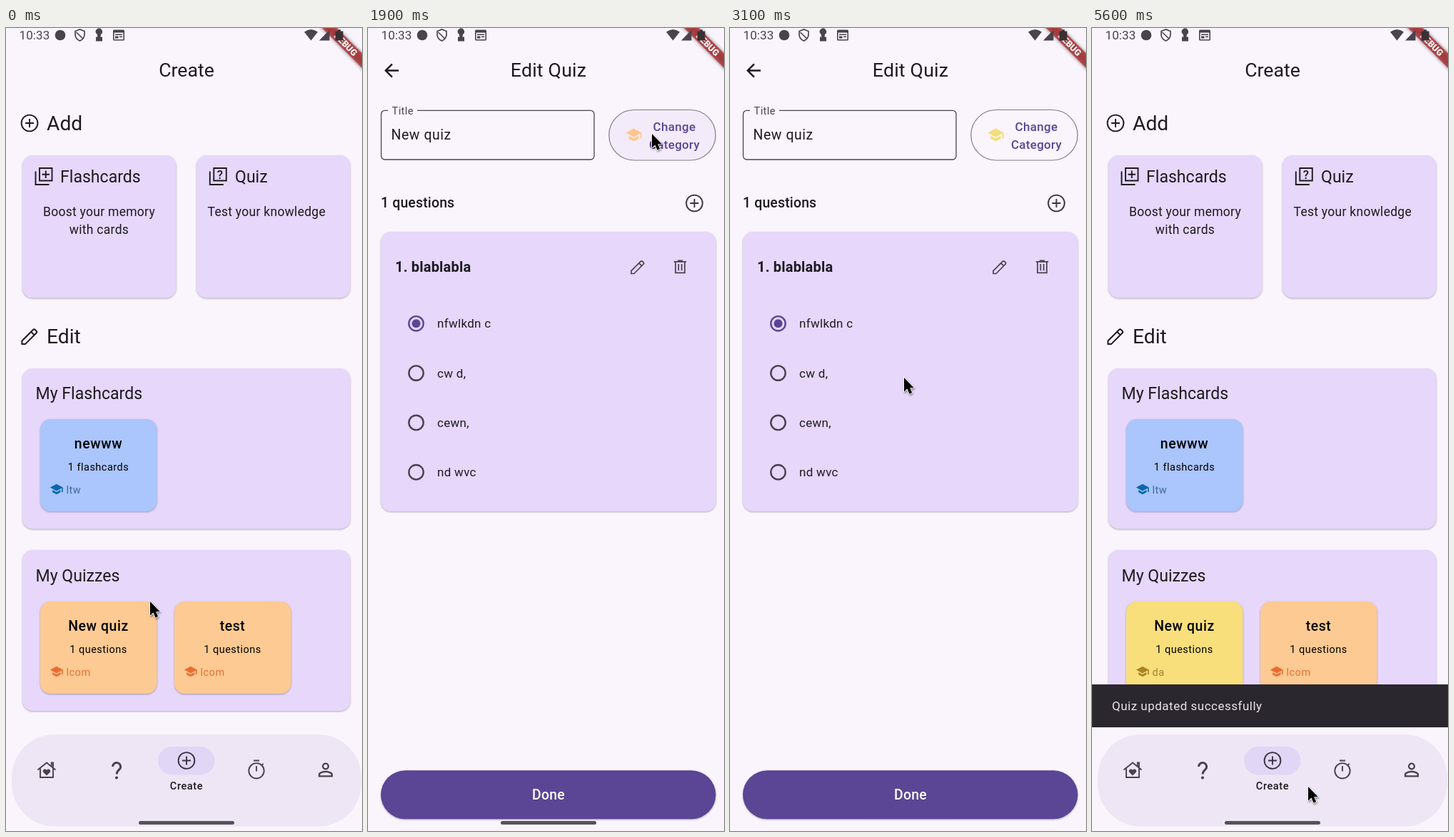
Animation, 499 px wide and 1123 px high, one loop 5.8 s. Source, as an HTML page:

```html
<!DOCTYPE html>
<html lang="en">
<head>
<meta charset="utf-8">
<title>Quiz editor</title>
<style>
html, body { margin: 0; width: 100%; height: 100%; overflow: hidden; background: #faf4fd; }
svg { display: block; width: 100vw; height: 100vh; font-family: Roboto, sans-serif; fill: #1d1a20; }
.card { fill: #e6d7fb; }
.raised { filter: drop-shadow(0 1.2px 1px rgba(0, 0, 0, .3)); }
.line { fill: none; stroke: #1d1a20; stroke-width: 1.9; }
.soft { fill: #48434c; }
</style>
</head>
<body>
<svg id="stage" viewBox="0 0 499 1123"></svg>
<script>
const LOOP = 5800, STEP = 100;
const INK = '#1d1a20', SOFT = '#48434c', PURPLE = '#5b4595';

// Filled icons on a 24 unit grid
const PATHS = {
  school: 'M5 13.18v4L12 21l7-3.82v-4L12 17l-7-3.82zM12 3L1 9l11 6 9-4.91V17h2V9L12 3z',
  laptop: 'M20 18c1.1 0 2-.9 2-2V5c0-1.1-.9-2-2-2H4c-1.1 0-2 .9-2 2v11c0 1.1.9 2 2 2H0v2h24v-2h-4zM4 5h16v11H4V5z',
  person: 'M12 5.9a2.1 2.1 0 1 1 0 4.2 2.1 2.1 0 0 1 0-4.2m0 9c2.97 0 6.1 1.46 6.1 2.1v1.1H5.9V17c0-.64 3.13-2.1 6.1-2.1M12 4a4 4 0 1 0 0 8 4 4 0 0 0 0-8zm0 9c-2.67 0-8 1.34-8 4v3h16v-3c0-2.66-5.33-4-8-4z',
  back: 'M20 11H7.83l5.59-5.59L12 4l-8 8 8 8 1.41-1.41L7.83 13H20v-2z',
  trash: 'M3.5 4.2h5V2.6h7v1.6h5v1.7h-1.3V21H4.8V5.9H3.5zM6.5 5.9v13.4h11V5.9zM9 8.2h1.7v9H9zM13.3 8.2H15v9h-1.7z'
};

// Stroked icons in pixels around their centre
const LINES = {
  add: 'M-11.400 0a11.400 11.400 0 1 0 22.800 0a11.400 11.400 0 1 0-22.800 0M-6 0h12M0-6v12',
  pencil: 'M-10 10v-4.300L4.700-9q1.300-1.300 2.600 0l1.700 1.700q1.300 1.300 0 2.600L-5.700 10zM2-6.300L6.300-2',
  stack: 'M-6-11.500h17.500v17.500H-6zM-11.500-7v18.500H7.500',
  plus: 'M-2.500-2.700h10.500M2.750-8v10.500',
  timer: 'M-10.700 1.300a10.700 10.700 0 1 0 21.400 0a10.700 10.700 0 1 0-21.400 0M-4-13h8M0-5.500v7.500M7.500-6.500l2.200-2.200',
  home: 'M-12.500 0L0-10l12.500 10M-9-2.500v13h18v-13M6.800-5v-5H9v6.500'
};

const text = (x, y, size, str, o = {}) =>
  `<text x="${x}" y="${y}" font-size="${size}" letter-spacing="${o.gap ?? 0}" font-weight="${o.weight || 400}"` +
  ` text-anchor="${o.mid ? 'middle' : 'start'}" fill="${o.fill || INK}">${str}</text>`;
const icon = (name, cx, cy, scale = 1.213, fill = INK, id = '') =>
  `<path ${id && `id="${id}"`} d="${PATHS[name]}" fill="${fill}" fill-rule="evenodd" ` +
  `transform="translate(${cx} ${cy}) scale(${scale}) translate(-12 -12)"/>`;
const lines = (name, cx, cy, color = INK, scale = 1) =>
  `<path class="line" style="stroke:${color}" d="${LINES[name]}" transform="translate(${cx} ${cy}) scale(${scale})"/>`;
const box = (x, y, w, h, r, attrs) =>
  `<rect x="${x}" y="${y}" width="${w}" height="${h}" rx="${r}" ${attrs}/>`;
const card = (x, y, w, h) => box(x, y, w, h, 14.5, 'class="card raised"');
const heading = (x, y, str) => text(x, y, 23.1, str);
const blurb = (x, y, str, mid) => text(x, y, 17.5, str, { gap: .28, mid });

// A small deck tile with a name, a count and its category
function tile(x, y, color, name, count, label, accent, labelColor, id = '') {
  return box(x, y, 163.5, 129, 14.5, `class="raised" ${id && `id="${id}Tile"`} fill="${color}"`) +
    text(x + 81.5, y + 41, 19.4, name, { weight: 500, gap: .6, mid: 1, fill: '#000' }) +
    text(x + 81.5, y + 72, 14.56, count, { gap: .48, mid: 1, fill: '#000' }) +
    icon('school', x + 22.8, y + 98, .81, accent, id && id + 'Hat') +
    `<g ${id && `id="${id}Label"`} style="fill:${labelColor}">` +
    text(x + 36.5, y + 103.5, 14.56, label, { gap: .48, fill: 'inherit' }) + '</g>';
}

const createPage = () =>
  '<rect width="499" height="1123" fill="#faf4fd"/>' +
  text(253, 68, 26.7, 'Create', { mid: 1 }) +
  lines('add', 33, 133) + text(57, 142.5, 28.2, 'Add') +
  card(23, 178, 215.5, 199.5) + card(267, 178, 215.5, 199.5) +
  lines('stack', 53, 207.5) + lines('plus', 53, 207.5) + heading(76, 216, 'Flashcards') +
  blurb(130.5, 262.5, 'Boost your memory', 1) + blurb(130.5, 287.5, 'with cards', 1) +
  lines('stack', 297.3, 207.5) + text(299.9, 211, 17, '?', { mid: 1, weight: 500 }) +
  heading(321, 216, 'Quiz') + blurb(282.5, 262.5, 'Test your knowledge') +
  lines('pencil', 33, 431.5, INK, 1.06) + text(57, 440.5, 28.2, 'Edit') +
  card(23, 476, 459.5, 224.5) + heading(41.5, 518.5, 'My Flashcards') +
  tile(48, 547, '#abc5fd', 'newww', '1 flashcards', 'ltw', '#0868a8', '#3c6b9f') +
  card(23, 730, 459.5, 225) + heading(41.5, 773.5, 'My Quizzes') +
  tile(48, 802, '#fdca93', 'New quiz', '1 questions', 'lcom', '#e96d30', '#e96d30', 'quiz') +
  tile(236, 802, '#fdca93', 'test', '1 questions', 'lcom', '#e96d30', '#e96d30') +
  '<g clip-path="url(#snackClip)"><g id="snack"><rect y="918" width="499" height="60" fill="#2b272f"/>' +
  '<g id="snackText">' + text(28, 954, 17, 'Quiz updated successfully', { gap: .5, fill: '#e9e2ec' }) + '</g></g></g>' +
  box(8, 988, 490, 128.5, 60, 'fill="#eee6f5"') +
  box(213, 1005, 79.5, 39.5, 19.7, 'fill="#e2d6f6"') +
  lines('home', 57, 1037.5, SOFT) +
  '<path class="soft" d="M57 1045.500l-4.300-4.200c-2.900-3.100 1.700-7 4.300-3.600 2.600-3.400 7.200.5 4.300 3.600z"/>' +
  `<path d="M149.600 1033a5.500 5.500 0 1 1 9.600 3.600c-2.200 2-4 3.400-4 7" fill="none" stroke="${SOFT}" stroke-width="3"/>` +
  '<circle class="soft" cx="155" cy="1048.500" r="2.100"/>' +
  lines('add', 253, 1024.5, '#3a3440') +
  lines('timer', 351, 1037.5, SOFT) + icon('person', 448, 1037.5, 1.26, SOFT) +
  text(253, 1064.5, 14.56, 'Create', { weight: 500, gap: .6, mid: 1 });

const editPage = () =>
  '<rect width="499" height="1123" fill="#faf4fd"/>' +
  icon('back', 33, 59.5, 1.25) + text(253, 68, 26.7, 'Edit Quiz', { mid: 1, gap: .2 }) +
  '<path d="M69 115.3H312a5 5 0 0 1 5 5V179a5 5 0 0 1-5 5H23.5a5 5 0 0 1-5-5V120.3a5 5 0 0 1 5-5H28" fill="none" stroke="#4a4550" stroke-width="1.3"/>' +
  text(33.5, 120.5, 14.56, 'Title', { gap: .45, fill: SOFT }) +
  text(32.5, 155.5, 19.4, 'New quiz', { gap: .6 }) +
  box(337.8, 114.5, 149.4, 70.5, 35.2, 'id="change" stroke="#837b88" stroke-width="1.2"') +
  icon('school', 372.5, 149.5, 1.01, '#fdc78d', 'changeHat') +
  text(429.5, 144, 17, 'Change', { weight: 500, gap: .3, mid: 1, fill: PURPLE }) +
  text(429.5, 169, 17, 'Category', { weight: 500, gap: .3, mid: 1, fill: PURPLE }) +
  text(18, 251, 19.4, '1 questions', { weight: 500, gap: .18 }) +
  lines('add', 457.5, 245, '#3a3440') +
  card(18, 285, 469.5, 391) +
  text(38, 341, 20, '1. blablabla', { weight: 700, gap: .18 }) +
  lines('pencil', 378, 334.5, SOFT, .9) + icon('trash', 437.5, 334, 1.02, SOFT) +
  ['nfwlkdn c', 'cw d,', 'cewn,', 'nd wvc'].map((s, i) => {
    const y = 413.3 + 69.3 * i, color = i ? SOFT : PURPLE;
    return `<circle cx="67.5" cy="${y}" r="10.2" fill="none" stroke="${color}" stroke-width="2.4"/>` +
      (i ? '' : `<circle cx="67.5" cy="${y}" r="6" fill="${color}"/>`) +
      text(97, y + 6, 17, s, { gap: .3 });
  }).join('') +
  box(18, 1038.3, 469.5, 68, 34, `class="raised" fill="${PURPLE}"`) +
  text(253, 1078.5, 19.4, 'Done', { weight: 500, gap: .3, mid: 1, fill: '#fff' });

const dialog = () =>
  '<rect width="499" height="1123" fill="#000" fill-opacity=".58"/>' +
  box(48, 376.3, 409.5, 368.7, 19.4, 'fill="#e6e0ec"') +
  text(253, 419, 23.1, 'Select a Category', { weight: 700, mid: 1 }) +
  '<rect x="67.5" y="587" width="371" height="69.3" fill="#eaeaea"/>' +
  [['da', 'school', '#ae8723'], ['esof', 'laptop', '#711a2a'],
   ['lcom', 'school', '#ee6f2f'], ['ltw', 'school', '#0868ac']].map(([s, name, color], i) => {
    const y = 482.3 + 69.3 * i;
    return icon(name, 102.5, y, 1.213, color) + text(136, y + 6.8, 19.4, s, { gap: .6 });
  }).join('');

const banner = () =>
  '<g transform="translate(499 0) rotate(45)">' +
  box(-60, 25, 120, 14.6, 0, 'fill-opacity=".5" fill="#000" style="filter:blur(2.6px)"') +
  box(-60, 25, 120, 14.6, 0, 'fill-opacity=".65" fill="#b71c1c"') +
  text(0, 36.6, 12.4, 'DEBUG', { weight: 900, mid: 1, fill: '#fff' }) + '</g>';

const statusBar = () =>
  text(18.5, 16, 17, '10:33', { gap: .1, fill: SOFT }) +
  '<g class="soft"><circle cx="76" cy="10" r="7.3"/>' +
  '<path d="M126 7a4.7 4.7 0 1 1 7 2l-.5 3.5h2.5v6h-9v-6h2.3l-.5-3.5z"/>' +
  '<path fill-rule="evenodd" d="M150 4a1.5 1.5 0 0 1 1.5-1.5h13A1.5 1.5 0 0 1 166 4v12a1.5 1.5 0 0 1-1.5 1.5h-13A1.5 1.5 0 0 1 150 16zM151.6 6.5v9.4h12.8V6.5zM153 8.500h10V10h-10zM153 11.5h4.5v3H153zM159 11.5h4V13h-4z"/>' +
  '<path d="M418 5.5q9.5-7 19 0L427.5 17.5zM439 17.5L453.5 2.5v15z"/></g>' +
  '<path d="M465 2.5h4v2h3.5v13h-11v-13h3.5z" fill="#3a3034"/>' +
  `<path d="M97 4.5l6.5-2.5 6.5 2.5v4.5q0 6-6.500 9-6.500-3-6.500-9zM98.500 6l9.500 9" fill="none" stroke="${SOFT}" stroke-width="1.7"/>`;

const stage = document.getElementById('stage');
stage.innerHTML =
  '<clipPath id="snackClip"><rect y="900" width="499" height="78"/></clipPath>' +
  `<g id="create">${createPage()}</g><g id="edit">${editPage()}</g><g id="dialog">${dialog()}</g>` +
  banner() + statusBar() + box(186, 1109, 134, 5, 2.5, 'id="handle"') +
  '<g id="cursor"><path transform="translate(1 1) scale(.84)" d="M0 0V23.5L5.3 18.5 9 27l4.3-1.9L9.700 17H16.500z" fill="#000" stroke="#fff" stroke-width="2" ' +
  'stroke-linejoin="round" paint-order="stroke" style="filter:drop-shadow(1px 2px 1.5px rgba(0,0,0,.4))"/></g>';

const $ = id => document.getElementById(id);
const clamp = x => Math.max(0, Math.min(1, x));
const ramp = (t, start, length) => clamp((t - start) / length);
const easeOut = p => 1 - (1 - p) ** 2;
const smooth = p => p * p * (3 - 2 * p);

// Pointer stops: leaves at, arrives at, x, y
const MOVES = [
  [0, 0, 201, 801], [50, 450, 166, 840], [1100, 1800, 397, 147],
  [2250, 2700, 243, 488], [3700, 4800, 302, 1060]
];

function pointer(t) {
  let [, , x, y] = MOVES[0];
  for (const [from, to, nx, ny] of MOVES.slice(1)) {
    const p = smooth(ramp(t, from, to - from));
    x += (nx - x) * p;
    y += (ny - y) * p;
  }
  return [x, y];
}

function zoom(id, scale, opacity) {
  $(id).setAttribute('transform', `translate(252.5 561) scale(${scale}) translate(-252.5 -561)`);
  $(id).style.opacity = opacity;
  $(id).style.display = opacity ? '' : 'none';
}

function draw(t) {
  const open = ramp(t, 560, 490), close = ramp(t, 5150, 200);
  zoom('create', 1 + .05 * easeOut(open) * (1 - easeOut(close)), 1);
  zoom('edit', .85 + .15 * easeOut(open) + .05 * close,
    close ? clamp(1.2 - 2 * close) : ramp(open, .1, .15));

  $('dialog').style.opacity = easeOut(ramp(t, 2050, 200)) * (1 - ramp(t, 2950, 100));
  // The handle turns white under the dialog and is lost in the page while it fades back
  const light = t >= 2200 && t < 3100, fading = t >= 3100 && t < 3200;
  $('handle').setAttribute('fill', light ? '#fff' : fading ? '#faf4fd' : '#575257');

  const saved = t >= 3000;
  $('changeHat').setAttribute('fill', saved ? '#f6dc78' : '#fdc78d');
  $('quizTile').setAttribute('fill', saved ? '#f8df7c' : '#fdca93');
  $('quizHat').setAttribute('fill', saved ? '#a88425' : '#e96d30');
  $('quizLabel').style.fill = saved ? '#a08130' : '#e96d30';
  $('quizLabel').firstChild.textContent = saved ? 'da' : 'lcom';
  $('change').setAttribute('fill', t >= 1700 && t < 2300 ? '#f4ebfa' : '#faf4fd');

  const rise = ramp(t, 5330, 250);
  $('snack').setAttribute('transform', `translate(0 ${60 * (1 - easeOut(rise))})`);
  $('snackText').style.opacity = ramp(rise, .4, .6);

  $('cursor').setAttribute('transform', `translate(${pointer(t)})`);
}

const began = performance.now();
function tick() {
  const t = (performance.now() - began) % LOOP;
  draw(Math.floor(t / STEP) * STEP);
  requestAnimationFrame(tick);
}
tick();
</script>
</body>
</html>
```
